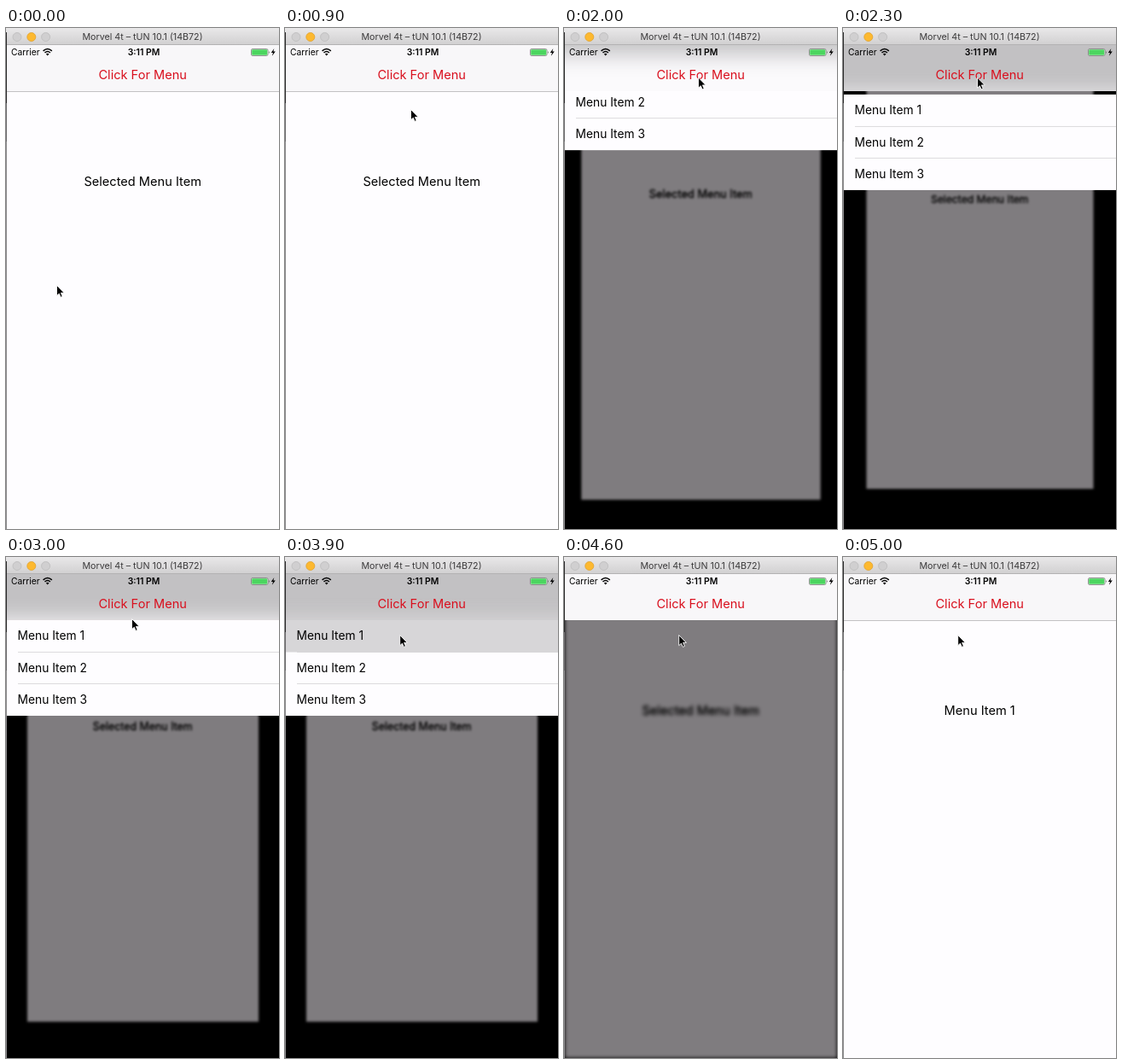
Write an HTML page that moves like this. It is 320x587 px and loops after 5.1 s.

```html
<!DOCTYPE html>
<html lang="en">
<head>
<meta charset="utf-8">
<title>Dropdown menu</title>
<style>
  html, body { margin: 0; width: 100%; height: 100%; overflow: hidden; background: #fff; }
  svg { display: block; width: 100vw; height: 100vh; }
  text { font-family: Inter, "Open Sans", sans-serif; }
  filter { color-interpolation-filters: sRGB; }
  .mid { text-anchor: middle; }
  .label { font-size: 14.6px; }
  .item { font-size: 13.8px; }
</style>
</head>
<body>
<svg viewBox="0 0 320 587" xmlns="http://www.w3.org/2000/svg">
  <defs>
    <linearGradient id="chrome" x2="0" y2="1">
      <stop offset="0" stop-color="#e9e8e9"/>
      <stop offset="1" stop-color="#d1d0d1"/>
    </linearGradient>
    <filter id="soft" filterUnits="userSpaceOnUse" x="-20" y="0" width="360" height="610">
      <feGaussianBlur stdDeviation="1.9"/>
    </filter>
    <filter id="frost" filterUnits="userSpaceOnUse" x="-60" y="-180" width="440" height="460">
      <feGaussianBlur stdDeviation="0 13"/>
    </filter>
    <clipPath id="screen"><rect x="1" y="20" width="319" height="567"/></clipPath>
    <clipPath id="bar"><rect x="1" y="20" width="319" height="54"/></clipPath>
  </defs>

  <!-- page -->
  <rect width="320" height="587" fill="#fefdff"/>
  <text id="label" class="label mid" x="160.2" y="185">Selected Menu Item</text>

  <!-- dropdown -->
  <g id="drop" clip-path="url(#screen)">
    <rect x="1" y="20" width="319" height="567" fill="#000"/>
    <g id="back">
      <g filter="url(#soft)">
        <rect x="1" y="20" width="319" height="567" fill="#7f7c7f"/>
        <text class="label mid" x="160.2" y="185" stroke="#000" stroke-width=".4">Selected Menu Item</text>
      </g>
    </g>
    <g id="menu">
      <rect x="1" y="74" width="319" height="112" fill="#fefdff"/>
      <path d="M14 111.5H320M14 148.5H320" stroke="#dcdbdd"/>
      <rect id="glow" x="1" y="74" width="319" height="37.5" fill="#d7d6d8"/>
      <g id="items"></g>
    </g>
  </g>

  <!-- status and navigation bar -->
  <rect id="nav" x="1" y="20" width="319" height="54"/>
  <g id="shine" clip-path="url(#bar)">
    <g filter="url(#frost)">
      <rect id="shade" x="-30" y="74" width="380" height="112"/>
    </g>
  </g>
  <path id="rule" d="M1 74.5H320" stroke="#c3c2c4"/>
  <text class="mid" x="160.2" y="60.3" font-size="14.6" fill="#d90f1d">Click For Menu</text>
  <text x="6" y="32" font-size="10.3">Carrier</text>
  <text class="mid" x="161.5" y="32" font-size="10.4" font-weight="600">3:11 PM</text>
  <g fill="none" stroke="#000" stroke-width="1.5">
    <path d="M43.6 26.9Q48.7 22.1 53.8 26.9M45.5 29Q48.7 26 51.9 29"/>
    <path d="M48.7 32.4L46.9 30.6Q48.7 29 50.5 30.6Z" fill="#000" stroke="none"/>
  </g>
  <rect x="287.5" y="24.5" width="19.5" height="8" rx="1.6" fill="#fff" stroke="#666" stroke-width=".7"/>
  <rect x="288.2" y="25.2" width="18.1" height="6.6" rx=".8" fill="#4cd660"/>
  <path d="M308 27V30.2Q309.3 28.6 308 27Z" fill="#444"/>
  <path d="M314.3 24L310.8 29H313L311.9 32.8L315.8 27.6H313.4Z"/>

  <!-- window frame -->
  <rect width="320" height="19.5" fill="url(#chrome)"/>
  <path d="M0 19.5H320" stroke="#b3b2b3"/>
  <g stroke-width=".8">
    <circle cx="13" cy="10.5" r="5" fill="#d0cfd0" stroke="#bcbbbc"/>
    <circle cx="29.8" cy="10.5" r="5" fill="#fdb930" stroke="#e0a02a"/>
    <circle cx="46.6" cy="10.5" r="5" fill="#d0cfd0" stroke="#bcbbbc"/>
  </g>
  <text class="mid" x="160" y="14.4" font-size="10.7" fill="#3b3a3b">Morvel 4t – tUN 10.1 (14B72)</text>
  <path d="M.5 5V88" stroke="#2a2a2a"/>
  <path d="M.5 88V133" stroke="#6c6b6d"/>
  <path d="M.5 133V587" stroke="#8c8b8d"/>

  <path id="cursor" d="M0 0V12.2L2.8 9.7L4.6 13.9L6.7 13L4.9 8.9H8.7Z" stroke="#fff" stroke-width=".9"/>
</svg>
<script>
const LOOP = 5100, STEP = 100, HALF = 250;
const OPEN = 1871, TAP = 3900, CLOSE = 3978, CLEAR = 4650;
const CX = 160.5, CY = 303.5;
const HIDDEN = -112, BOUNCE = 20;
const SMALL = 0.85, SMALLEST = 0.769;
// time, x, y of the pointer tip
const PATH = [
  [0, 59.5, 301.5], [600, 128, 133], [1200, 167, 58], [1600, 157.5, 58],
  [2500, 157.5, 58], [3000, 147.5, 72.5], [3500, 134.7, 91.5], [LOOP, 134.7, 91.5]
];

const $ = id => document.getElementById(id);
const set = (id, attrs) => {
  for (const k in attrs) $(id).setAttribute(k, attrs[k]);
};
const show = (id, on) => set(id, { visibility: on ? 'visible' : 'hidden' });
const mix = (a, b, p) => a + (b - a) * p;
const ease = p => p * p * (3 - 2 * p);

$('items').innerHTML = [1, 2, 3].map(n =>
  `<text class="item" x="13.5" y="${59.8 + n * 37.5}">Menu Item ${n}</text>`).join('');

// two eased halves: from a over b to c
function bounce(t, a, b, c) {
  const u = Math.min(Math.max(t / HALF, 0), 2);
  return u < 1 ? mix(a, b, ease(u)) : mix(b, c, ease(u - 1));
}

function pointer(t) {
  const i = PATH.findIndex(p => p[0] > t);
  const a = PATH[i - 1], b = PATH[i];
  const p = (t - a[0]) / (b[0] - a[0]);
  return [mix(a[1], b[1], p), mix(a[2], b[2], p)];
}

function draw(t) {
  const closing = t >= CLOSE;
  const y = closing ? bounce(t - CLOSE, 0, BOUNCE, HIDDEN) : bounce(t - OPEN, HIDDEN, BOUNCE, 0);
  const s = closing ? bounce(t - CLOSE, SMALL, SMALLEST, 1) : bounce(t - OPEN, 1, SMALLEST, SMALL);
  const open = t >= OPEN && t < CLEAR;
  const dim = t >= OPEN && t < CLOSE + 2 * HALF;
  const lit = t >= TAP;

  show('drop', open);
  $('menu').style.display = dim ? '' : 'none';
  show('glow', open && lit);
  show('shine', dim);
  set('menu', { transform: `translate(0 ${y})` });
  set('shade', { y: 74 + y, fill: lit ? '#dddcde' : '#fbfafc' });
  set('back', { transform: `translate(${CX} ${CY}) scale(${s}) translate(${-CX} ${-CY})` });
  set('nav', { fill: dim ? '#c2c1c3' : '#f8f7f9' });
  show('rule', !open);
  $('label').textContent = t < CLEAR ? 'Selected Menu Item' : 'Menu Item 1';
  set('cursor', { transform: `translate(${pointer(t)})` });
}

const start = performance.now() - 16;
function tick() {
  const t = (performance.now() - start) % LOOP;
  draw(Math.floor(t / STEP) * STEP);
  requestAnimationFrame(tick);
}
tick();
</script>
</body>
</html>
```
